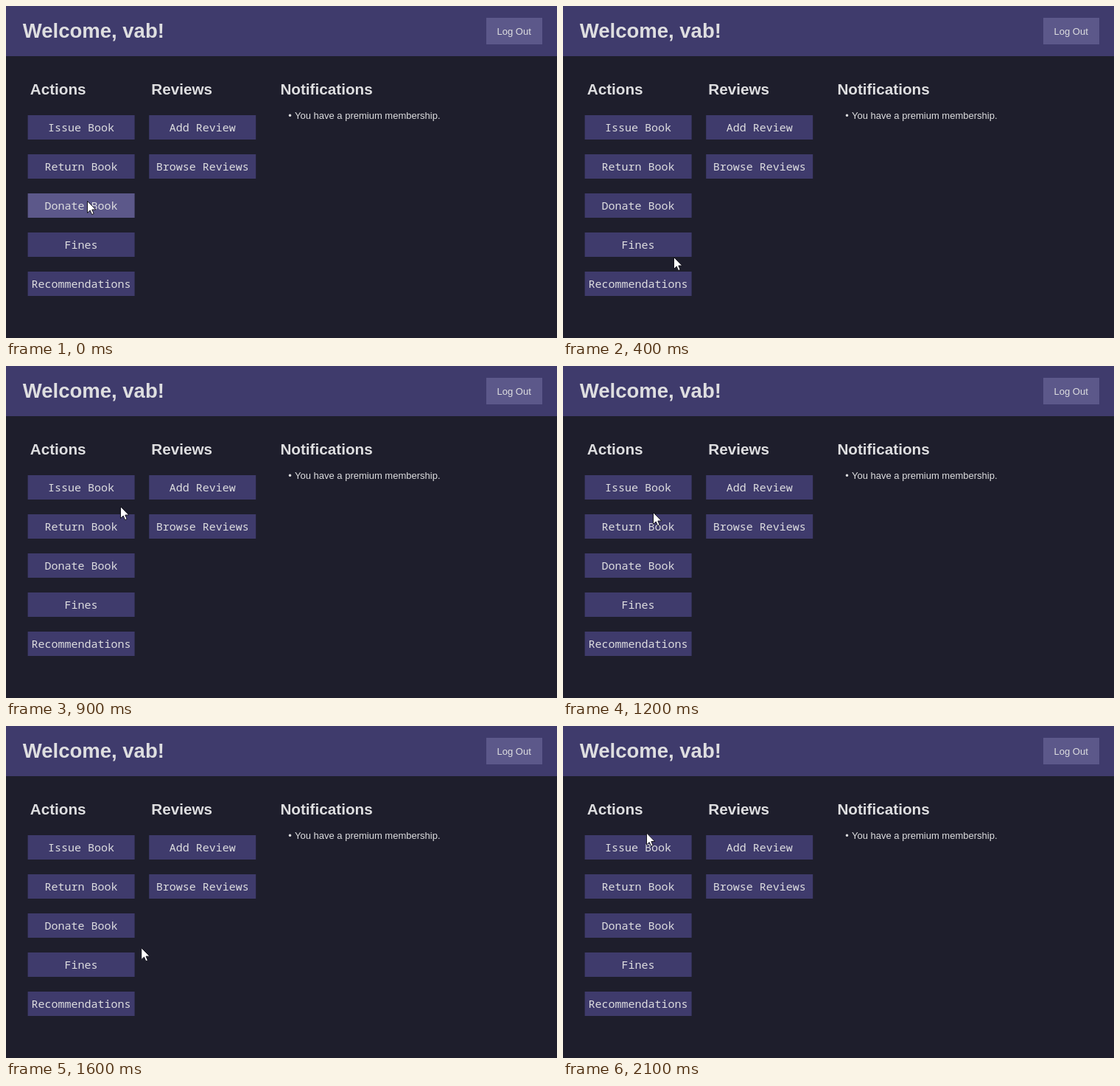
These frames come from a looping animation (748 px wide and 450 px high, 2.2 s). An HTML page:

```html
<!DOCTYPE html>
<html lang="en">
<head>
<meta charset="utf-8">
<title>Library dashboard</title>
<style>
  html, body { margin: 0; width: 100%; height: 100%; overflow: hidden; background: #1e1e2c; }
  svg { display: block; width: 748px; height: 450px; }
  text { fill: #dedee0; font-family: "Liberation Sans", Arial, sans-serif; font-size: 13px; }
  .bar, .button rect { fill: #3f3b6c; }
  .logout, .button.hover rect { fill: #5c588a; }
  .title { font-size: 27.5px; font-weight: bold; }
  .heading { font-size: 20.7px; font-weight: bold; }
  .button text { font-family: "Noto Sans Mono", "DejaVu Sans Mono", monospace; font-size: 15px; text-anchor: middle; }
</style>
</head>
<body>
<svg viewBox="0 0 748 450">
  <rect width="748" height="450" fill="#1e1e2c"/>
  <rect class="bar" width="748" height="68"/>
  <text class="title" x="22.8" y="43">Welcome, vab!</text>
  <rect class="logout" x="652" y="16" width="76" height="36"/>
  <text x="666.5" y="39">Log Out</text>
  <text class="heading" x="32.7" y="120">Actions</text>
  <text class="heading" x="197.3" y="120">Reviews</text>
  <text class="heading" x="372.4" y="120">Notifications</text>
  <text x="383.3" y="153">•</text>
  <text x="392" y="153">You have a premium membership.</text>
  <g id="buttons"></g>
  <path id="cursor" d="M.5 .5V16.5L4.2 13L6.6 18.6L9.2 17.5L6.8 12H11.8Z"
        fill="#fff" stroke="#16151f" stroke-width="1"/>
</svg>
<script>
  const STEP = 100, STEPS = 22;
  const SIZE = { w: 145, h: 33, gap: 53, top: 148 };
  const columns = [
    { x: 29.6, labels: ["Issue Book", "Return Book", "Donate Book", "Fines", "Recommendations"] },
    { x: 194.2, labels: ["Add Review", "Browse Reviews"] }
  ];

  // Turning points of the pointer: step, x, y
  const keys = [
    [0, 110, 264], [2, 95, 373], [4, 150, 340], [6, 238, 169], [9, 155, 190],
    [12, 122, 198], [14, 126, 366], [18, 222, 202], [21, 113, 144.5]
  ];

  const group = document.getElementById("buttons");
  const cursor = document.getElementById("cursor");

  function add(parent, tag, attrs, label = "") {
    const node = document.createElementNS("http://www.w3.org/2000/svg", tag);
    for (const key in attrs) node.setAttribute(key, attrs[key]);
    node.textContent = label;
    return parent.appendChild(node);
  }

  const buttons = columns.flatMap(({ x, labels }) => labels.map((label, row) => {
    const y = SIZE.top + row * SIZE.gap;
    const node = add(group, "g", { class: "button" });
    add(node, "rect", { x, y, width: SIZE.w, height: SIZE.h });
    add(node, "text", { x: x + SIZE.w / 2, y: y + 22 }, label);
    return { node, x, y };
  }));

  // Key by index, repeating before and after the loop
  function keyAt(i) {
    const lap = Math.floor(i / keys.length);
    const [step, x, y] = keys[i - lap * keys.length];
    return [step + lap * STEPS, x, y];
  }

  // Smooth closed curve through the keys
  function pointer(step) {
    const i = keys.findLastIndex(key => key[0] <= step);
    const [before, from, to, after] = [-1, 0, 1, 2].map(n => keyAt(i + n));
    const span = to[0] - from[0];
    const u = (step - from[0]) / span;
    return [1, 2].map(axis => {
      const slope = (a, b) => (b[axis] - a[axis]) / (b[0] - a[0]) * span;
      const ease = u * u * (3 - 2 * u);
      return from[axis] + (to[axis] - from[axis]) * ease
        + slope(before, to) * u * (1 - u) ** 2
        - slope(from, after) * u * u * (1 - u);
    });
  }

  function draw(time) {
    const [px, py] = pointer(Math.floor(time / STEP) % STEPS);
    cursor.setAttribute("transform", `translate(${px} ${py})`);
    for (const { node, x, y } of buttons) {
      const inside = px >= x && px < x + SIZE.w && py >= y && py < y + SIZE.h;
      node.classList.toggle("hover", inside);
    }
  }

  const start = performance.now();
  function tick() {
    draw(performance.now() - start);
    requestAnimationFrame(tick);
  }
  tick();
</script>
</body>
</html>
```
